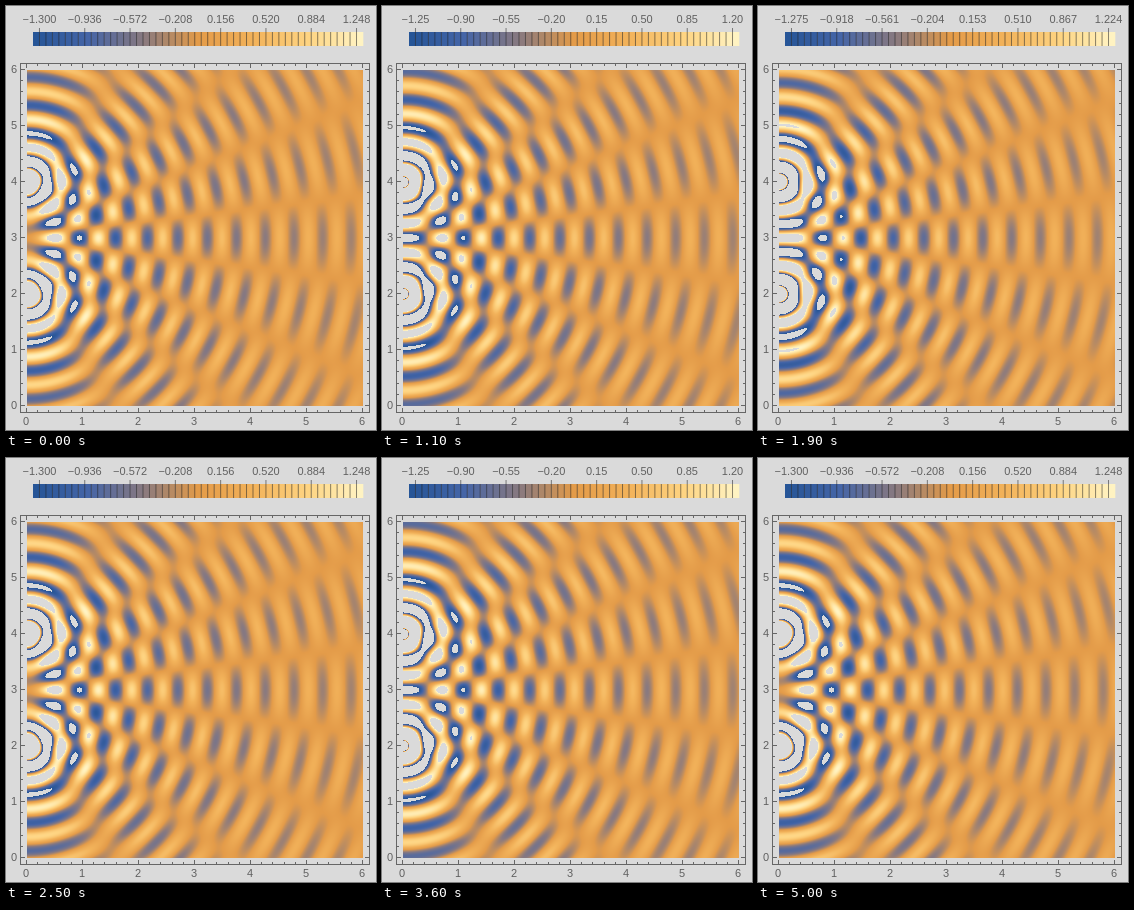
Recreate the animation shown at these times as an HTML page with a canvas. Size 370 by 424 pixels, loop 5100 ms.

```html
<!DOCTYPE html>
<html lang="en">
<head>
<meta charset="utf-8">
<title>Two-source interference</title>
<style>
  html, body { margin: 0; width: 100%; height: 100%; overflow: hidden; background: #dadada; }
  canvas, svg { position: absolute; left: 0; top: 0; display: block; }
  text { font: 11px "Liberation Sans", Arial, sans-serif; fill: #606060; text-anchor: middle; }
  .frame { stroke: #666; fill: none; shape-rendering: crispEdges; }
</style>
</head>
<body>
<canvas id="field" width="370" height="424"></canvas>
<svg id="chart" width="370" height="424" viewBox="0 0 370 424"></svg>
<script>
const SIZE = 336, UNIT = 56, LEFT = 21, TOP = 64;
const STEP_MS = 100, LOOP_MS = 5100, PHASES = 5;
const WAVE = 4 * Math.PI;
// Contour spacing of the legend in each phase
const SPACING = [0.052, 0.05, 0.05, 0.051, 0.051];
const BANDS = 51, BAR_X = 27, BAR_W = 330, BAND_W = BAR_W / BANDS;
const STOPS = [
  [36, 84, 150], [69, 101, 167], [136, 121, 128], [227, 155, 73],
  [242, 178, 90], [254, 212, 130], [255, 245, 198]
];

const chart = document.getElementById("chart");
const ctx = document.getElementById("field").getContext("2d");

function add(name, attrs, text) {
  const el = document.createElementNS("http://www.w3.org/2000/svg", name);
  for (const key in attrs) el.setAttribute(key, attrs[key]);
  if (text !== undefined) el.textContent = text;
  return chart.appendChild(el);
}

function color(u) {
  const p = Math.min(Math.max(u, 0), 1) * (STOPS.length - 1);
  const i = Math.min(Math.floor(p), STOPS.length - 2);
  return STOPS[i].map((c, k) => Math.round(c + (STOPS[i + 1][k] - c) * (p - i)));
}

function drawAxes() {
  add("rect", { x: 14.5, y: 57.5, width: 349, height: 349, class: "frame" });
  let d = "";
  for (let i = 0; i <= 30; i++) {
    const len = i % 5 ? 3 : 5;
    const x = 20.5 + i * UNIT / 5, y = 399.5 - i * UNIT / 5;
    d += `M${x} 57v${len}M${x} 407v${-len}M14 ${y}h${len}M364 ${y}h${-len}`;
  }
  add("path", { d, class: "frame" });
  for (let n = 0; n <= 6; n++) {
    add("text", { x: 20 + n * UNIT, y: 419 }, n);
    add("text", { x: 8, y: 403 - n * UNIT }, n);
  }
}

function drawLegend() {
  let lines = "";
  for (let i = 0; i < BANDS; i++) {
    const x = BAR_X + i * BAND_W;
    add("rect", { x, y: 26, width: BAND_W + 0.3, height: 14, fill: `rgb(${color((i + 0.5) / BANDS)})` });
    if (i) lines += `M${x} ${(i - 1) % 7 ? 26 : 22}V40`;
  }
  add("path", { d: lines, stroke: "#222", "stroke-opacity": 0.6, "stroke-width": 0.9 });
  return Array.from({ length: 8 }, (_, i) =>
    add("text", { x: BAR_X + BAND_W * (1 + 7 * i), y: 17 }, ""));
}

// Outgoing circular waves from (0, 2) and (0, 4), left blank outside the plot range
function makeField(phase) {
  const img = ctx.createImageData(SIZE, SIZE);
  const step = SPACING[phase], shift = 2 * Math.PI * phase / PHASES;
  const low = -25.5 * step, high = 24.7 * step;
  const wave = (x, y) => {
    const r = Math.hypot(x, y);
    return Math.sin(WAVE * r - shift) / r;
  };
  for (let j = 0, p = 0; j < SIZE; j++) {
    const y = (SIZE - j - 0.5) / UNIT;
    for (let i = 0; i < SIZE; i++, p += 4) {
      const x = (i + 0.5) / UNIT;
      const v = wave(x, y - 2) + wave(x, y - 4);
      if (v < low || v > high) continue;
      img.data.set(color((v / step + 26) / BANDS), p);
      img.data[p + 3] = 255;
    }
  }
  return img;
}

drawAxes();
const labels = drawLegend();
const fields = SPACING.map((_, phase) => makeField(phase));
let shown = -1;

function show(phase) {
  if (phase === shown) return;
  shown = phase;
  ctx.putImageData(fields[phase], LEFT, TOP);
  const step = SPACING[phase], digits = step === 0.05 ? 2 : 3;
  labels.forEach((label, i) => {
    label.textContent = (step * (7 * i - 25)).toFixed(digits).replace("-", "\u2212");
  });
}

const start = performance.now();
function tick() {
  const t = Math.max(0, performance.now() - start) % LOOP_MS;
  show(Math.floor(t / STEP_MS) % PHASES);
  requestAnimationFrame(tick);
}
show(0);
requestAnimationFrame(tick);
</script>
</body>
</html>
```
